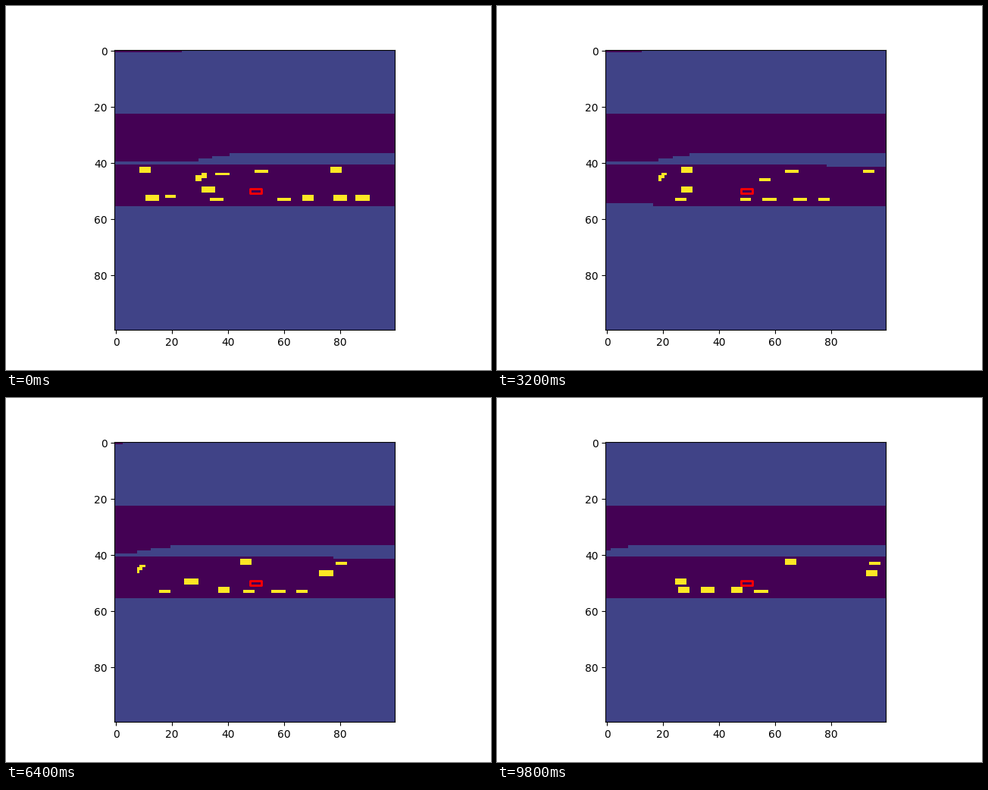
Animation, 640 px wide and 480 px high, one loop 9900 ms. Source, as a matplotlib script:

```python
import numpy as np
import matplotlib.pyplot as plt
from matplotlib.animation import FuncAnimation
from matplotlib.patches import Rectangle

SIZE = 100
ROAD, GROUND, CAR = 0, 1, 5
STEPS = 50
CAR_LENGTH, CAR_WIDTH = 4.5, 1.5
LEFT_LIMIT = 6.5  # nothing on the road is drawn further behind
GROUND_SPEED = 0.67  # cells per step

# Column, columns per step, row, rows per step, relative to the red car.
PASSING = [
    (9.0, 1.13, 42.7, 0),
    (50.7, 0.89, 43.2, 0),
    (77.05, 0.95, 42.7, 0.03),
]
PARKED = [
    (11.7, -0.7, 52.7, 0),
    (18.3, -0.75, 52.2, 0.04),
    (34.9, -0.59, 53.2, 0),
    (58.9, -0.67, 53.25, -0.014),
    (67.0, -0.655, 53.4, -0.011),
    (78.8, -0.685, 53.4, -0.01),
    (86.9, -0.672, 53.45, -0.004),
]


def settle(start, end, step, span):
    return end + (start - end) * np.exp(-step / span)


def draw_road(grid, step):
    shift = GROUND_SPEED * step
    grid[23:37] = ROAD
    grid[41:56] = ROAD
    for row, start in ((0, 24), (37, 41), (38, 34.6), (39, 29.8)):
        grid[row, :max(0, round(start - shift))] = ROAD
    upper = np.interp(step, [0, 12, 21, 28, 36, 43], [100, 74, 86, 72, 84, 100])
    lower = np.interp(step, [0, 12, 21], [0, 30, 0])
    grid[41, round(upper):] = GROUND
    grid[55, :round(lower)] = GROUND


def draw_car(grid, x, y):
    if x >= LEFT_LIMIT:
        grid[int(y):int(y + CAR_WIDTH), int(x):int(x + CAR_LENGTH)] = CAR


def draw_cars(grid, step):
    for x, vx, y, vy in PASSING:
        draw_car(grid, x + vx * step, y + vy * step)
    for x, vx, y, vy in PARKED:
        x, y = x + vx * step, y + vy * step
        tilt = settle(0.025, 0, step, 5)  # the view straightens out
        draw_car(grid, x, y - tilt * max(0, x - SIZE / 2))
    # One car changes lane, another matches the red car's speed.
    draw_car(grid, 36.7 + 1.153 * step, settle(44.2, 46.75, step, 12))
    draw_car(grid, settle(31.7, 24.7, step, 16), 49.7)


def draw_slanted(grid, step):
    x = 29.9 - 0.66 * step
    if x < LEFT_LIMIT:
        return
    left, size = int(x), 2 if step < 6 else 1
    grid[44, left + size:left + size + 2] = CAR
    grid[45, left:left + 2 * size] = CAR
    grid[46, left:left + size] = CAR


def scene(step):
    grid = np.full((SIZE, SIZE), GROUND)
    draw_road(grid, step)
    draw_cars(grid, step)
    draw_slanted(grid, step)
    return grid


fig, ax = plt.subplots(figsize=(6.4, 4.8), dpi=100)
image = ax.imshow(scene(0), cmap="viridis", vmin=ROAD, vmax=CAR,
                  interpolation="nearest")
ax.add_patch(Rectangle((48, 49), 4, 1.8, fill=False, edgecolor="red",
                       linewidth=2, joinstyle="round"))


def update(tick):
    image.set_data(scene(tick // 2))
    return [image]


# Two ticks per step; the last step lasts only one.
anim = FuncAnimation(fig, update, frames=2 * STEPS - 1, interval=100,
                     repeat=True, repeat_delay=0)
plt.show()
```
